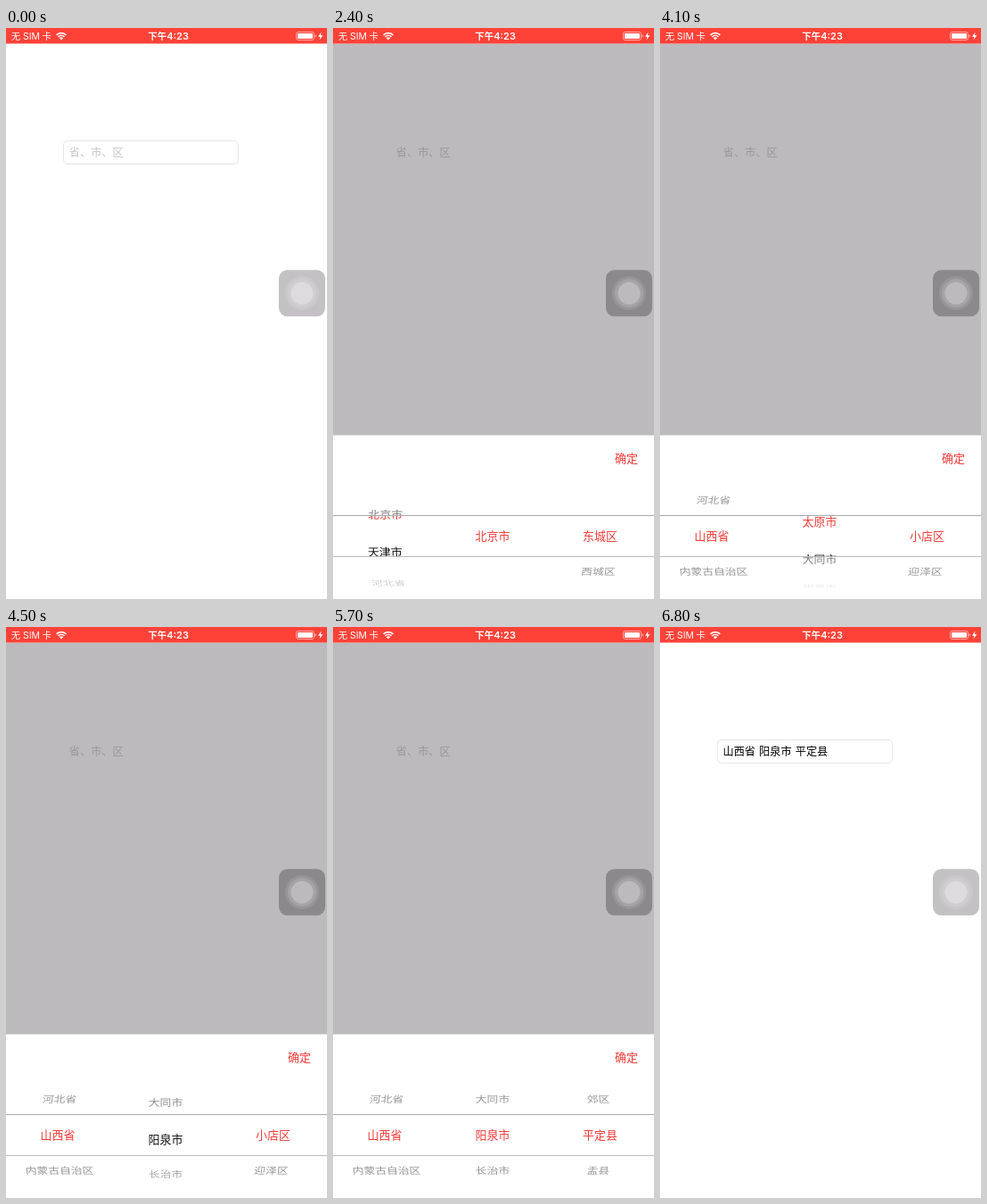
Recreate the animation shown at these times as an HTML page with a canvas. Size 360 px wide and 640 px high, loop 7000 ms.

```html
<!DOCTYPE html>
<html lang="zh-CN">
<head>
<meta charset="utf-8">
<title>地区选择</title>
<style>
html, body { margin: 0; width: 100%; height: 100%; overflow: hidden; background: #fff; }
canvas { display: block; width: 100%; height: 100%; }
</style>
</head>
<body>
<canvas id="stage"></canvas>
<script>
const W = 360, H = 640, LOOP = 7000;
const RED = '#ff4238', TEXT_RED = '#f23a36', DIM = '#bcbabd';
const CJK = '"Noto Sans CJK SC", "Noto Sans CJK", sans-serif';
const LATIN = 'Inter, sans-serif';

// Picker wheel: radius, angle between rows, centre line and selection band
const R = 66, ROW = 0.65, MID = 569.5, BAND_TOP = 546.5, BAND_END = 592;
const COLUMNS = [58, 179, 299.5];

const provinces = ['北京市', '天津市', '河北省', '山西省', '内蒙古自治区', '辽宁省'];
const beijing = ['北京市'];
const shanxi = ['太原市', '大同市', '阳泉市', '长治市', '晋城市'];
const dongcheng = ['东城区', '西城区', '朝阳区'];
const taiyuan = ['小店区', '迎泽区', '杏花岭区'];
const yangquan = ['城区', '矿区', '郊区', '平定县', '盂县'];

const canvas = document.getElementById('stage');
const ctx = canvas.getContext('2d');
const dpr = window.devicePixelRatio || 1;
canvas.width = W * dpr;
canvas.height = H * dpr;

function rect(x, y, w, h, color) {
  ctx.fillStyle = color;
  ctx.fillRect(x, y, w, h);
}

function roundRect(x, y, w, h, r, fill, stroke) {
  ctx.beginPath();
  ctx.roundRect(x, y, w, h, r);
  if (fill) { ctx.fillStyle = fill; ctx.fill(); }
  if (stroke) { ctx.strokeStyle = stroke; ctx.lineWidth = 1; ctx.stroke(); }
}

function disc(x, y, r, fill) {
  ctx.beginPath();
  ctx.arc(x, y, r, 0, Math.PI * 2);
  ctx.fillStyle = fill;
  ctx.fill();
}

// y is the vertical middle of the glyphs
function text(str, x, y, size, color, { weight = 400, family = CJK, align = 'left' } = {}) {
  ctx.font = `${weight} ${size}px ${family}`;
  ctx.textAlign = align;
  ctx.fillStyle = color;
  ctx.fillText(str, x, y + size * 0.38);
}

function clipped(top, bottom, draw) {
  ctx.save();
  ctx.beginPath();
  ctx.rect(0, top, W, bottom - top);
  ctx.clip();
  draw();
  ctx.restore();
}

function wifi(x, y) {
  ctx.strokeStyle = ctx.fillStyle = '#fff';
  ctx.lineWidth = 1.7;
  const from = -Math.PI * 0.75, to = -Math.PI * 0.25;
  for (const r of [7.7, 4.9]) {
    ctx.beginPath();
    ctx.arc(x, y, r, from, to);
    ctx.stroke();
  }
  ctx.beginPath();
  ctx.moveTo(x, y);
  ctx.arc(x, y, 3, from, to);
  ctx.fill();
}

function statusBar() {
  rect(0, 0, W, 17.5, RED);
  text('无', 5.7, 9.2, 10.4, '#fff');
  text('SIM', 19, 9.2, 10.5, '#fff', { family: LATIN });
  text('卡', 40.6, 9.2, 10.4, '#fff');
  wifi(62, 13.4);
  text('下午', 159.3, 9.2, 10.4, '#fff', { weight: 700 });
  text('4:23', 180.2, 9.2, 11, '#fff', { weight: 600, family: LATIN });
  roundRect(325.5, 4.5, 20, 9, 2.2, null, 'rgba(255,255,255,0.55)');
  roundRect(327, 6, 17, 6, 1, '#fff');
  roundRect(346.6, 7.5, 1.2, 3, 0.6, 'rgba(255,255,255,0.6)');
  ctx.beginPath();
  [[353.6, 4.6], [350, 9.7], [352.4, 9.7], [351.6, 13.4], [355.4, 8.2], [352.9, 8.2]]
    .forEach(([x, y]) => ctx.lineTo(x, y));
  ctx.fillStyle = '#fff';
  ctx.fill();
}

function touchButton(colors) {
  roundRect(306, 271.3, 52, 52, 9.5, colors[0]);
  [19, 16, 12.5].forEach((r, i) => disc(332, 297.3, r, colors[i + 1]));
}

function page(chosen) {
  roundRect(64.5, 126.5, 196, 26, 4.5, '#fff', '#e6e6e8');
  if (chosen) {
    ['山西省', '阳泉市', '平定县'].forEach((s, i) => text(s, 70.5 + i * 40.6, 139.2, 12.2, '#000'));
  } else {
    text('省、市、区', 70.8, 139.2, 12.2, '#c7c7cc');
  }
  touchButton(['#c3c1c4', '#cac8cb', '#cfcdd0', '#dddbde']);
}

function wheelRow(str, x, angle, color, alpha) {
  const c = Math.cos(angle), s = Math.sin(angle), depth = 0.083;
  const scale = 1 - depth * (1 - c);
  const dx = x - W / 2;
  ctx.save();
  ctx.globalAlpha = alpha;
  ctx.transform(scale, 0, -dx * depth * s / R, c, W / 2 + dx * scale, MID + R * s);
  text(str, 0, 0, 13, color, { weight: 500, align: 'center' });
  ctx.restore();
}

function wheel({ rows, pos, selected }, x) {
  rows.forEach((str, i) => {
    const angle = (i - pos) * ROW;
    if (Math.abs(angle) > 1.25) return;
    const fade = Math.max(0, Math.min(0.5, (Math.cos(angle) - 0.4) * 1.05));
    const outer = () => wheelRow(str, x, angle, '#000', fade);
    clipped(512, BAND_TOP, outer);
    clipped(BAND_END, 627, outer);
    clipped(BAND_TOP, BAND_END, () =>
      wheelRow(str, x, angle, i === selected ? TEXT_RED : '#111', 1));
  });
}

// Position moves in six 100 ms steps; the highlight follows once it settles
function spin(rows, t, start, target) {
  const k = Math.max(0, Math.min(6, Math.floor((t - start) / 100) + 1)) / 6;
  return { rows, pos: target * (k + k * k - k * k * k), selected: k === 1 ? target : 0 };
}

function picker(t) {
  rect(0, 17.5, W, 440, DIM);
  text('省、市、区', 70.8, 139.2, 12.2, '#99979b');
  touchButton(['#8b898c', '#979598', '#a5a3a6', DIM]);
  rect(0, 456.5, W, H - 456.5, '#fff');
  text('确定', 316, 482.5, 13, TEXT_RED, { weight: 500 });

  const cities = t < 2900 ? beijing : shanxi;
  const districts = t < 2900 ? dongcheng : t < 4600 ? taiyuan : yangquan;
  wheel(spin(provinces, t, 2400, 3), COLUMNS[0]);
  wheel(spin(cities, t, 4100, 2), COLUMNS[1]);
  wheel(spin(districts, t, 5200, 3), COLUMNS[2]);
  rect(0, 546, W, 1, '#aaa');
  rect(0, 592, W, 1, '#bbb');
}

function draw(t) {
  ctx.setTransform(dpr, 0, 0, dpr, 0, 0);
  rect(0, 0, W, H, '#fff');
  if (t >= 1300 && t < 6800) picker(t);
  else page(t >= 6800);
  statusBar();
}

const began = performance.now();
function tick() {
  draw((performance.now() - began) % LOOP);
  requestAnimationFrame(tick);
}
tick();
</script>
</body>
</html>
```
